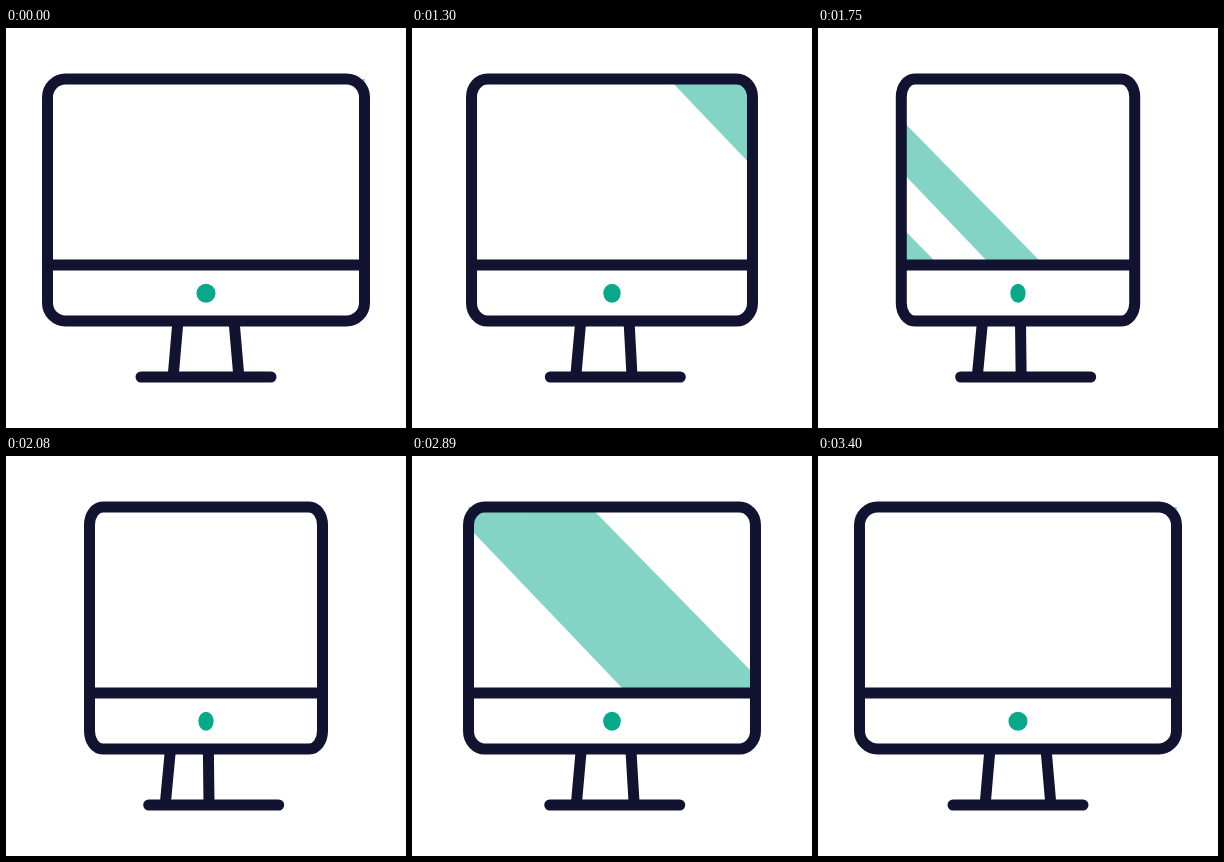
These frames come from a looping animation (400 by 400 pixels, 3430 ms). An HTML page:

```html
<!DOCTYPE html>
<html lang="en">
<head>
<meta charset="utf-8">
<title>Turning monitor</title>
<style>
  html, body { margin: 0; width: 100%; height: 100%; overflow: hidden; background: #fff; }
  svg { display: block; width: 100vw; height: 100vh; }
  .line { fill: none; stroke: #121331; stroke-width: 11; }
</style>
</head>
<body>
<svg viewBox="0 0 400 400">
  <clipPath id="screen"><rect id="pane" y="51" height="186"/></clipPath>
  <g clip-path="url(#screen)" fill="#84d4c5">
    <polygon id="wide"/>
    <polygon id="slim"/>
  </g>
  <g class="line">
    <path id="legs"/>
    <path id="foot" d="M135 349H265" stroke-linecap="round"/>
    <rect id="frame" y="51" height="242" ry="18"/>
    <path id="bar"/>
  </g>
  <ellipse id="dot" cx="200" cy="265.2" ry="9.5" fill="#08a88a"/>
</svg>
<script>
const LOOP = 3430, HOLD = 1000, STEP = 30;
const el = id => document.getElementById(id);
const set = (id, attrs) => {
  for (const key in attrs) el(id).setAttribute(key, attrs[key]);
};
const mix = (a, b, k) => a + (b - a) * k;
const span = (n, start, length) => Math.min(1, Math.max(0, (n - start) / length));
const smooth = k => k * k * (3 - 2 * k);

// Cubic bezier easing with handles (x1, 0) and (x2, 1).
function ease(x, x1 = 0.36, x2 = 0.39) {
  let lo = 0, hi = 1;
  for (let i = 0; i < 24; i++) {
    const u = (lo + hi) / 2, v = 1 - u;
    if (3 * x1 * u * v * v + 3 * x2 * u * u * v + u * u * u < x) lo = u;
    else hi = u;
  }
  return smooth(lo);
}

// Sweeps right to left, then back again.
function sweep(n, out, outLength, back, backLength) {
  const k = n < 42 ? smooth(span(n, out, outLength)) : 1 - smooth(span(n, back, backLength));
  return mix(527, -27, k);
}

// Slanted band whose edges meet y = 232 at x and x + width.
function band(id, x, width) {
  const edge = (b, slope, y) => `${b - (232 - y) * slope},${y}`;
  const r = x + width;
  set(id, { points: [edge(x, 0.955, 45), edge(r, 0.98, 45), edge(r, 0.98, 240), edge(x, 0.955, 240)].join(' ') });
}

function draw(n) {
  const turn = ease(span(n, 0, 27)) - ease(span(n, 47, 33));
  const half = mix(158.5, 116.5, turn);
  const left = 200 - half, width = half * 2;

  set('pane', { x: left, width });
  set('frame', { x: left, width, rx: 18 * half / 158.5 });
  set('bar', { d: `M${left} 237H${left + width}` });
  set('dot', { rx: mix(9.5, 7.6, turn) });
  set('legs', {
    d: `M${mix(171.7, 164.2, turn)} 296L${mix(167.2, 159.3, turn)} 348` +
       `M${mix(228.3, 202.4, turn)} 296L${mix(232.8, 203, turn)} 348`
  });
  set('foot', { transform: `translate(${7.7 * turn} 0)` });

  band('wide', sweep(n, 2, 30, 47.1, 30), 89 * (half + 5.5) / 164);
  band('slim', sweep(n, 8.8, 27, 50.8, 27), n < 42 ? 53 : 70);
}

const origin = performance.now();
function tick() {
  const t = (performance.now() - origin) % LOOP;
  draw(Math.max(0, Math.floor((t - HOLD) / STEP)));
  requestAnimationFrame(tick);
}
tick();
</script>
</body>
</html>
```
